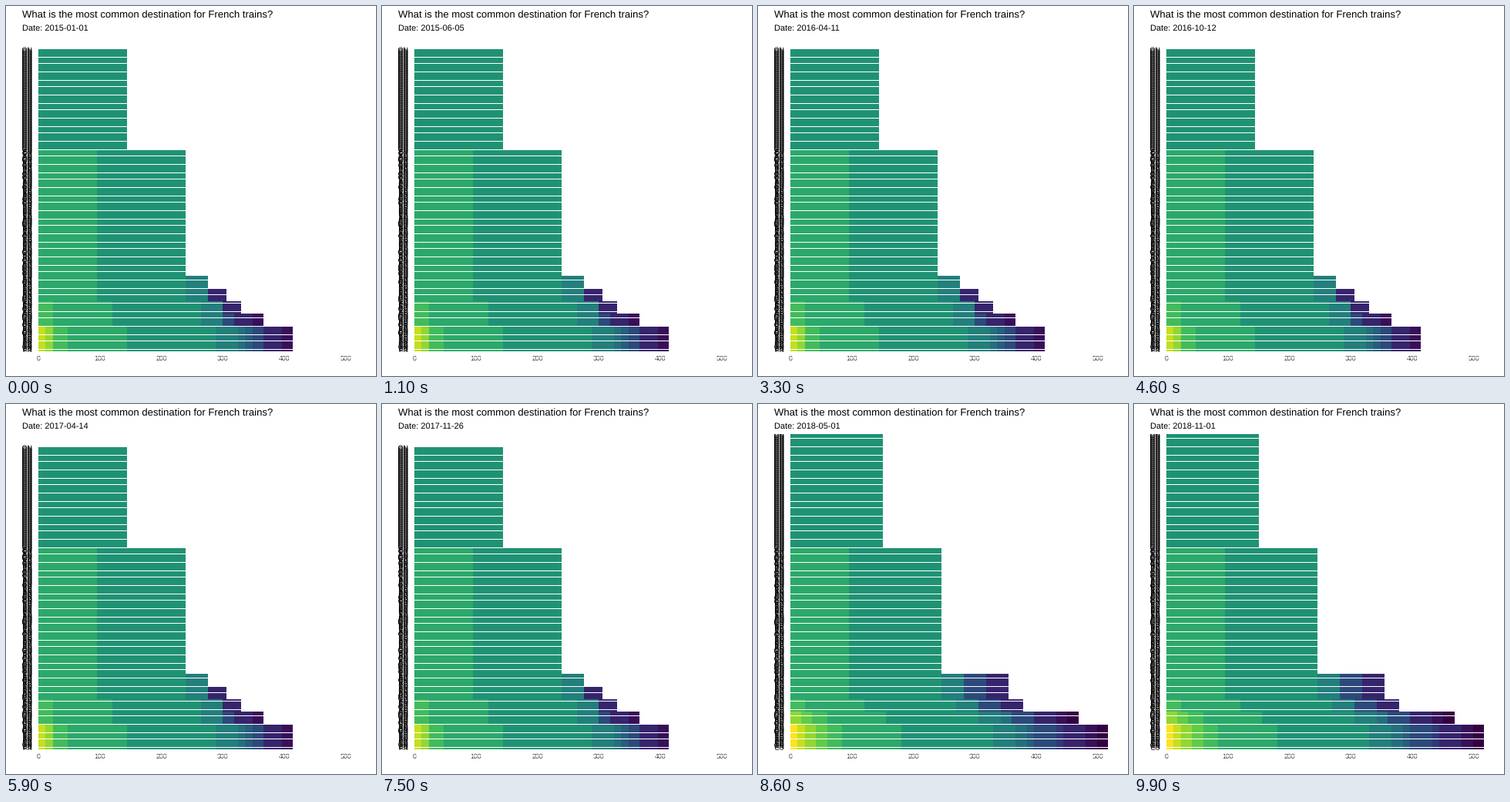
Write a matplotlib script that moves like this. It is 480 px wide and 480 px high and loops after 10 s.

```python
import random

import matplotlib.pyplot as plt
import numpy as np
from matplotlib.animation import FuncAnimation
from matplotlib.collections import PathCollection
from matplotlib.patches import Rectangle
from matplotlib.path import Path
from matplotlib.textpath import TextPath

plt.rcParams["font.family"] = "Liberation Sans"
plt.rcParams["text.hinting"] = "none"

SIZE, DPI = 480, 100
FRAMES, INTERVAL = 100, 100
START, DAYS = np.datetime64("2015-01-01"), 1400
LEAVE, ARRIVE = 75, 78          # steps between which the bars slide
X0, UNIT = 41.7, 0.799          # pixel of zero, pixels per train
PITCH = 30 / 19                 # pixels per station

LEVELS = "abcdefghijklmno"
COLORS = dict(zip(LEVELS, [
    "#340042", "#380f58", "#36246c", "#313878", "#2b4a7b",
    "#275d7d", "#246f7d", "#227f7c", "#209274", "#2ca86b",
    "#42bb5c", "#62cb47", "#91d732", "#c5df1d", "#fde323"]))
BEFORE = dict(n=12, m=12, k=24, j=96, i=144, h=36, g=12, f=12, e=18, c=30, b=18)
AFTER = dict(o=12, n=12, m=18, l=18, k=24, j=96, i=150, h=36,
             g=18, f=12, e=36, d=12, c=36, b=18, a=18)

# top, bottom, stacked levels before and after
TIERS = [
    (39, 56, "", "i"),
    (56, 187, "i", "i"),
    (187, 350, "ji", "ji"),
    (350, 367, "jih", "jihec"),
    (367, 383, "jihc", "jihec"),
    (383, 399, "kjihc", "kjihec"),
    (399, 416, "kjihecb", "mlkjihgecba"),
    (416, 448, "nmkjihgfecb", "onmlkjihgfedcba"),
]

fig = plt.figure(figsize=(SIZE / DPI, SIZE / DPI), dpi=DPI, facecolor="white")
ax = fig.add_axes([0, 0, 1, 1])
ax.set(xlim=(0, SIZE), ylim=(SIZE, 0))
ax.axis("off")


def put(x, y, text, px, color="black", ha="left"):
    return ax.text(x, y, text, fontsize=px * 72 / DPI, color=color,
                   ha=ha, va="baseline")


def box(x, y, w, h, color, z):
    return ax.add_patch(Rectangle((x, y), w, h, fc=color, lw=0,
                                  antialiased=False, zorder=z))


def stack(levels, sizes):
    """Left and right edge of every level in one stacked bar."""
    edges, x = {}, 0
    for k in levels:
        edges[k] = np.array([x, x + sizes[k]])
        x += sizes[k]
    return edges


def station_labels(top):
    """The crowded, overlapping ends of the station names."""
    rng = random.Random(4)
    paths = []
    for y in np.arange(top, 447, PITCH):
        word = "ON" if y < 187 else rng.choice(["ON", "AN", "EN", "ES", "RS"])
        glyphs = TextPath((0, 0), word, size=8.8,
                          prop={"family": "Liberation Sans"})
        right = glyphs.vertices[:, 0].max()
        spot = [33.2 - right, y + 3.1]
        paths.append(Path(glyphs.vertices * [1, -1] + spot, glyphs.codes))
    labels = PathCollection(paths, facecolor="black", lw=0)
    ax.add_collection(labels, autolim=False)
    labels.set_clip_path(Rectangle((21, 39), 13, 410, transform=ax.transData))
    return labels


put(21, 15, "What is the most common destination for French trains?", 13.16)
date = put(21, 32, "", 11)
for n in range(0, 501, 100):
    put(X0 + n * UNIT, 460, str(n), 8.8, "#404040", "center")

labels_before, labels_after = station_labels(56.5), station_labels(39.8)

# gaps between the bars, seen only where they fall on a whole pixel row
for base in range(44, 448, 30):
    for y in (base, base + 11, base + 22):
        box(42, y, 420, 1, "white", 3)

bars = []
for top, bottom, old, new in TIERS:
    a, b = stack(old, BEFORE), stack(new, AFTER)
    for k in new:
        patch = box(X0, top, 0, bottom - top, COLORS[k], 2)
        bars.append((patch, a.get(k), b[k]))


def update(i):
    date.set_text(f"Date: {START + np.timedelta64(DAYS * i // (FRAMES - 1), 'D')}")
    t = min(max((i - LEAVE) / (ARRIVE - LEAVE), 0), 1)
    for patch, a, b in bars:
        patch.set_visible(a is not None or t == 1)
        left, right = b if a is None else a + (b - a) * t
        x = round(X0 + left * UNIT)
        patch.set_x(x)
        patch.set_width(round(X0 + right * UNIT) - x)
    labels_before.set_visible(t < 1)
    labels_after.set_visible(t == 1)
    return []


anim = FuncAnimation(fig, update, frames=FRAMES, interval=INTERVAL,
                     init_func=lambda: update(0), repeat=True,
                     repeat_delay=0, blit=False)
plt.show()
```
